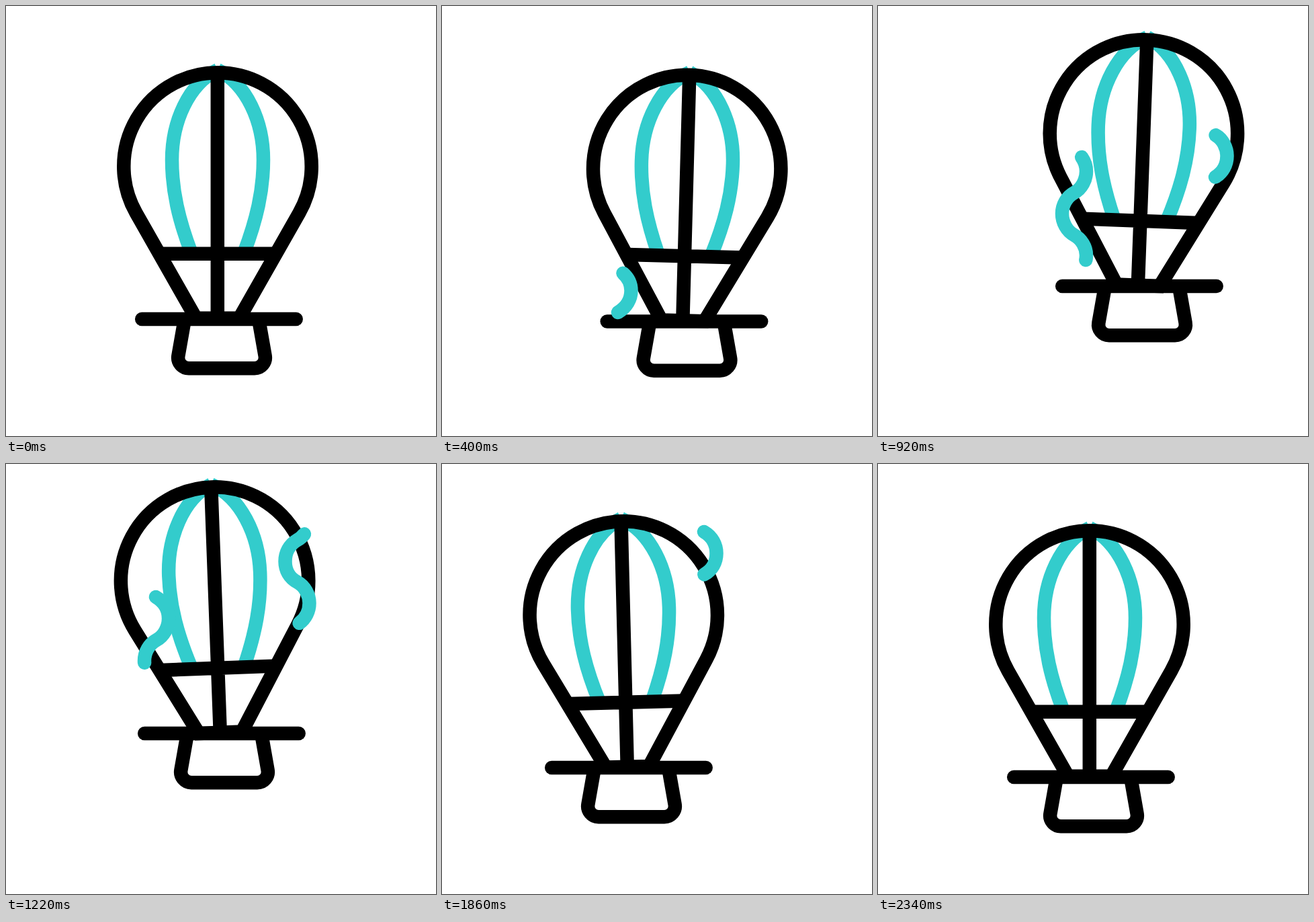
Animation, 640 px wide and 640 px high, one loop 2400 ms. Source, as an HTML page:

```html
<!DOCTYPE html>
<html lang="en">
<head>
<meta charset="utf-8">
<title>Hot air balloon</title>
<style>
  html, body { margin: 0; width: 100%; height: 100%; overflow: hidden; background: #fff; }
  svg { display: block; width: 100%; height: 100%; fill: none; stroke: #000; stroke-width: 20.5; }
  .teal { stroke: #33cccc; }
  .round { stroke-linecap: round; }
</style>
</head>
<body>
<svg viewBox="0 0 640 640">
  <g id="craft">
    <g id="envelope">
      <g class="teal">
        <path d="M315 95C272 116 247 172 247 229C247 275 257 318 276 368"/>
        <path d="M315 95C358 116 383 172 383 229C383 275 373 318 354 368"/>
      </g>
      <path d="M282.8 464.8L193.6 308A139.7 139.7 0 1 1 436.4 308L347.2 464.8Z"/>
      <path d="M314.8 99V465M230 368.7H400"/>
    </g>
    <path class="round" d="M202.2 466H431.7"/>
    <path d="M266 466L256.4 520.5A16 16 0 0 0 272 539.3H370A16 16 0 0 0 385.6 520.5L376 466"/>
    <path id="leftWind" class="teal round" pathLength="1" d="M218.5 452.5C231 445 238 433 238 420C238 408 231 396 220 390C209 384 202 371 202 358C202 345 209 333 220 327C231 321 238 308 238 295C238 282 231 270 219 263"/>
    <path id="rightWind" class="teal round" pathLength="1" d="M430 303.5C441 297 447.5 285 447.5 272C447.5 260 441 247 430 241C418 235 411.5 223 411.5 210C411.5 197 418 185 429 178.5C441 172 447.5 160 447.5 147C447.5 134 441 122 429 115"/>
  </g>
</svg>
<script>
const LOOP = 2400, STEP = 20;
const [craft, envelope, leftWind, rightWind] =
  ['craft', 'envelope', 'leftWind', 'rightWind'].map(id => document.getElementById(id));

// Flight path: time, x, y
const flight = [
  [0, 0, 0], [200, 13.5, 1.6], [400, 43.5, 3.5], [540, 66, 3], [640, 81, -2.5],
  [760, 90, -20], [920, 72, -49], [1080, 37.5, -62.5], [1220, 4, -65],
  [1380, -27, -60], [1540, -46, -48.5], [1620, -51.5, -39.5], [1740, -50, -25],
  [1860, -39, -14], [2000, -24.5, -6], [2160, -8.5, -1.5], [2340, 0, 0]
];

const ease = (t, from, to) => {
  const u = Math.min(1, Math.max(0, (t - from) / (to - from)));
  return u * u * (3 - 2 * u);
};

// Tangent of the flight path at a key, at rest on both ends
function slope(i, axis) {
  const a = flight[i - 1], b = flight[i], c = flight[i + 1];
  if (!a || !c) return 0;
  const h = b[0] - a[0], k = c[0] - b[0];
  return ((b[axis] - a[axis]) / h * k + (c[axis] - b[axis]) / k * h) / (h + k);
}

function position(t, axis) {
  const i = flight.findIndex(key => key[0] > t) - 1;
  if (i < 0) return 0;
  const a = flight[i], b = flight[i + 1], span = b[0] - a[0];
  const u = (t - a[0]) / span, v = 1 - u;
  return v * v * (1 + 2 * u) * a[axis] + u * u * (3 - 2 * u) * b[axis]
    + span * u * v * (v * slope(i, axis) - u * slope(i + 1, axis));
}

function drawWind(path, head, tail) {
  const length = head - tail;
  path.style.display = length > 0 ? '' : 'none';
  path.setAttribute('stroke-dasharray', `${length} 2`);
  path.setAttribute('stroke-dashoffset', -tail);
}

function draw(t) {
  const tilt = 3 * ease(t, 0, 780) - 6 * ease(t, 780, 1360) + 3 * ease(t, 1360, 2340);
  craft.setAttribute('transform', `translate(${position(t, 1)} ${position(t, 2)})`);
  envelope.setAttribute('transform', `rotate(${tilt} 315 466)`);
  drawWind(leftWind, ease(t, 0, 1100), ease(t, 640, 1820));
  drawWind(rightWind, ease(t, 500, 1600), ease(t, 1140, 2320));
}

const start = performance.now();
function tick() {
  const t = (performance.now() - start) % LOOP;
  draw(Math.floor(t / STEP) * STEP);
  requestAnimationFrame(tick);
}
tick();
</script>
</body>
</html>
```
